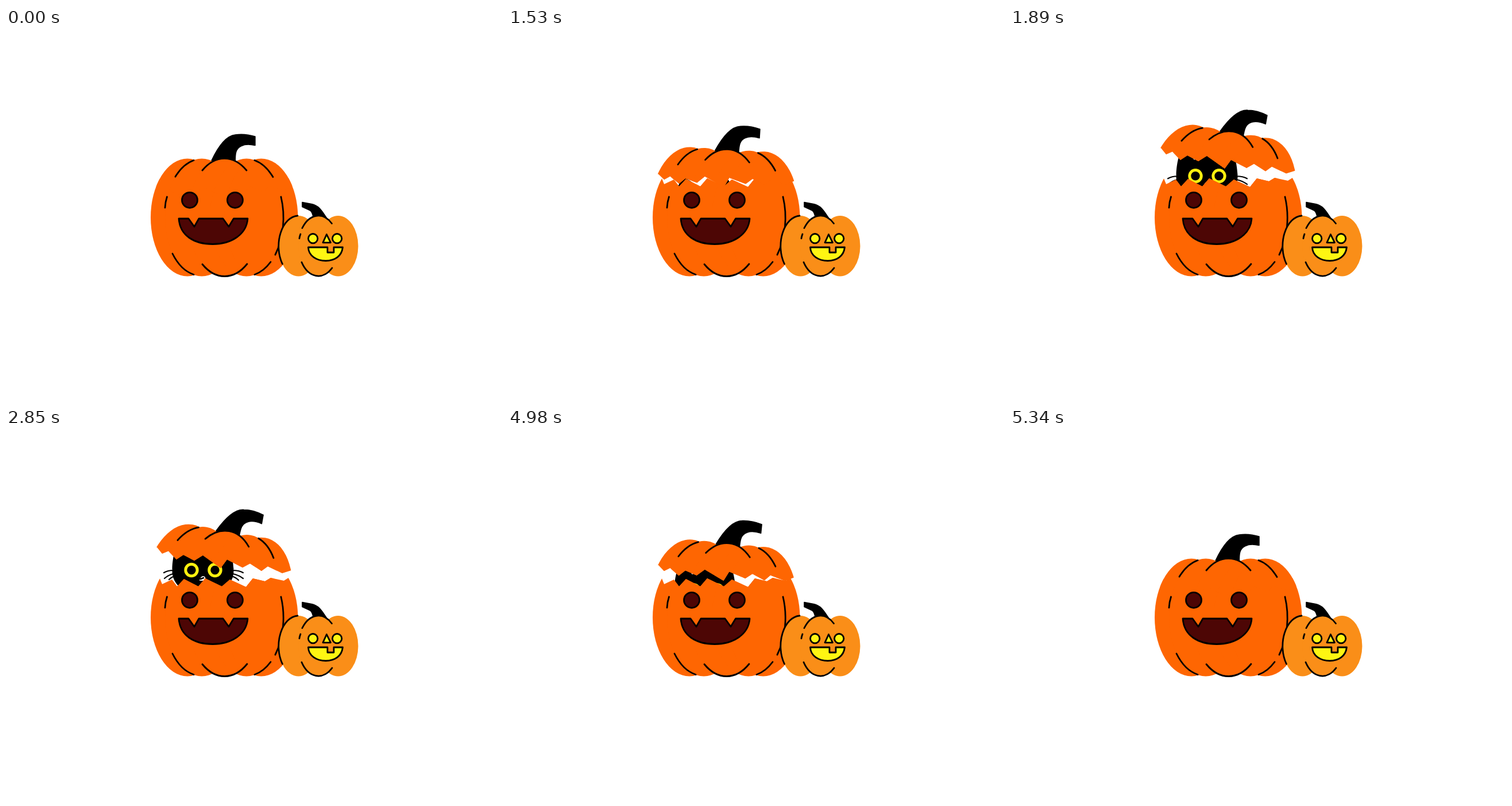
Write an HTML page that moves like this. It is 864 by 648 pixels and loops after 5.37 s.

```html
<!DOCTYPE html>
<html lang="en">
<head>
<meta charset="utf-8">
<title>Pumpkins</title>
<style>
  html, body { margin: 0; width: 100%; height: 100%; overflow: hidden; background: #fff; }
  svg { display: block; width: 100%; height: 100%; }
  .line { fill: none; stroke: #000; stroke-width: 2.8; stroke-linecap: round; }
  .face { stroke: #000; stroke-width: 2.8; stroke-linejoin: round; }
  .stem { stroke: #000; stroke-width: 1.5; stroke-linejoin: round; }
</style>
</head>
<body>
<svg viewBox="0 0 864 648">
  <defs>
    <g id="lobes" fill="#fe6602">
      <ellipse cx="316" cy="330" rx="64" ry="102.5"/>
      <ellipse cx="341" cy="330" rx="64" ry="102.5"/>
      <ellipse cx="380.5" cy="330" rx="64" ry="102.5"/>
      <ellipse cx="419" cy="330" rx="64" ry="102.5"/>
      <ellipse cx="444.5" cy="330" rx="64" ry="102.5"/>
    </g>
    <clipPath id="lower">
      <path d="M240 262H268L272 272 289 264 298 276 310 263 335 276 347 262 376 276 390 264 418 277 430 262 451 267 461 261 484 266 492 261H520V450H240Z"/>
    </clipPath>
    <clipPath id="upper">
      <path d="M240 200V277.7H262L272.7 287 282.7 280.5 299 292.3 309.5 282.3 330 288.7 343 277 377.5 293.3 385.7 276.5 414.8 285.5 426.3 276.2 448.3 285.5 457.7 275.6 484.5 283 499.3 275.2H520V200Z"/>
    </clipPath>
  </defs>

  <g id="cat">
    <ellipse cx="343" cy="250" rx="53.5" ry="42"/>
    <path d="M289.5 246C290 222 297 199 306 192Q319 196 331 211H356Q368 196 380 192C389 199 395 222 396.5 246Z"/>
    <path d="M313 197Q320 206 321 218M373 197Q366 206 365 218" fill="none" stroke="#fff" stroke-width="2.5" stroke-linecap="round"/>
    <g fill="none" stroke="#fdf00f" stroke-width="5">
      <circle cx="323" cy="247.5" r="10.2"/>
      <circle cx="364" cy="247.5" r="10.2"/>
    </g>
    <path d="M337 266Q339 258 343.500 258T348 266Z" fill="#fff"/>
    <path d="M339 263L344 261" class="line" stroke-width="1.5"/>
    <path class="line" style="stroke-width:2.2" d="M291 248Q282 248 275 252M291 254Q283 256 276 262M293 258Q288 260 284 264M395 248Q406 248 413 252M395 254Q405 256 413 262M393 258Q400 260 405 265"/>
  </g>

  <use href="#lobes" clip-path="url(#lower)"/>
  <path class="line" d="M280.500 294Q277.500 303 277 313M290 393A64 102.500 0 0 0 327 429.500M342 411.500A64 102.500 0 0 0 420 411M433 429.500A64 102.500 0 0 0 461 407.500M479 294A64 102.500 0 0 1 469 395"/>

  <g id="lid">
    <path class="stem" d="M358 231C366 214 381 188 399 186Q416 183.500 434 189V204.500Q419 201 410 205.500C400 210 399 219 399.500 234H358Z"/>
    <use href="#lobes" clip-path="url(#upper)"/>
    <path class="line" d="M327 230.500A64 102.500 0 0 0 295 259M342 248A64 102.500 0 0 1 419 248M433 230.500A64 102.500 0 0 1 465 259.500"/>
  </g>

  <g class="face" fill="#4d0605">
    <circle cx="320" cy="299.800" r="13.500"/>
    <circle cx="399" cy="299.800" r="13.500"/>
    <path d="M301 332H318L328 346 336 332H378L388 346 396.500 332H421C419 360 392 376.500 360 376.500S303 362 301 332Z"/>
  </g>

  <path class="stem" d="M516 303.500L532 306.500C545 309 550 318 558 330H535Q534 320 529 317.500L516 311.500Z"/>
  <g fill="#fa8e18">
    <ellipse cx="509.500" cy="379.700" rx="35" ry="52.800"/>
    <ellipse cx="578.500" cy="379.700" rx="35" ry="52.800"/>
    <ellipse cx="544" cy="379.700" rx="35" ry="52.800"/>
  </g>
  <path class="line" d="M508 327A35 53 0 0 0 481.500 411M516 348.500A35 53 0 0 1 567.500 340.500M515 408A35 53 0 0 0 568 418M513 359Q511.500 363 511 366.500"/>
  <g class="face" fill="#fef512">
    <circle cx="534.700" cy="366.700" r="8.200"/>
    <circle cx="576.700" cy="366.700" r="8.200"/>
    <path d="M558.500 359.500L552 373.800H565.500Z"/>
    <path d="M526.500 382H560V391H571V382H586.500C585 397 573 405.500 557 405.500S527 397 526.500 382Z"/>
  </g>
</svg>
<script>
  const LOOP = 5370, STEP = 30, MOVE = 670;
  const lid = document.getElementById('lid');
  const cat = document.getElementById('cat');

  // Smooth 0 to 1 over MOVE ms
  function ease(t, start) {
    const u = Math.min(1, Math.max(0, (t - start) / MOVE));
    return u * u * (3 - 2 * u);
  }

  function draw(now) {
    const t = Math.floor(now % LOOP / STEP) * STEP;
    const close = ease(t, 4670);
    const open = ease(t, 1270) - close;
    const peek = ease(t, 1370) - close;
    lid.setAttribute('transform',
      `translate(${4.5 * open} ${-48 * open}) rotate(${10.3 * open} 380.5 248)`);
    cat.setAttribute('transform', `translate(0 ${80 * (1 - peek)})`);
    requestAnimationFrame(draw);
  }
  draw(performance.now());
</script>
</body>
</html>
```
